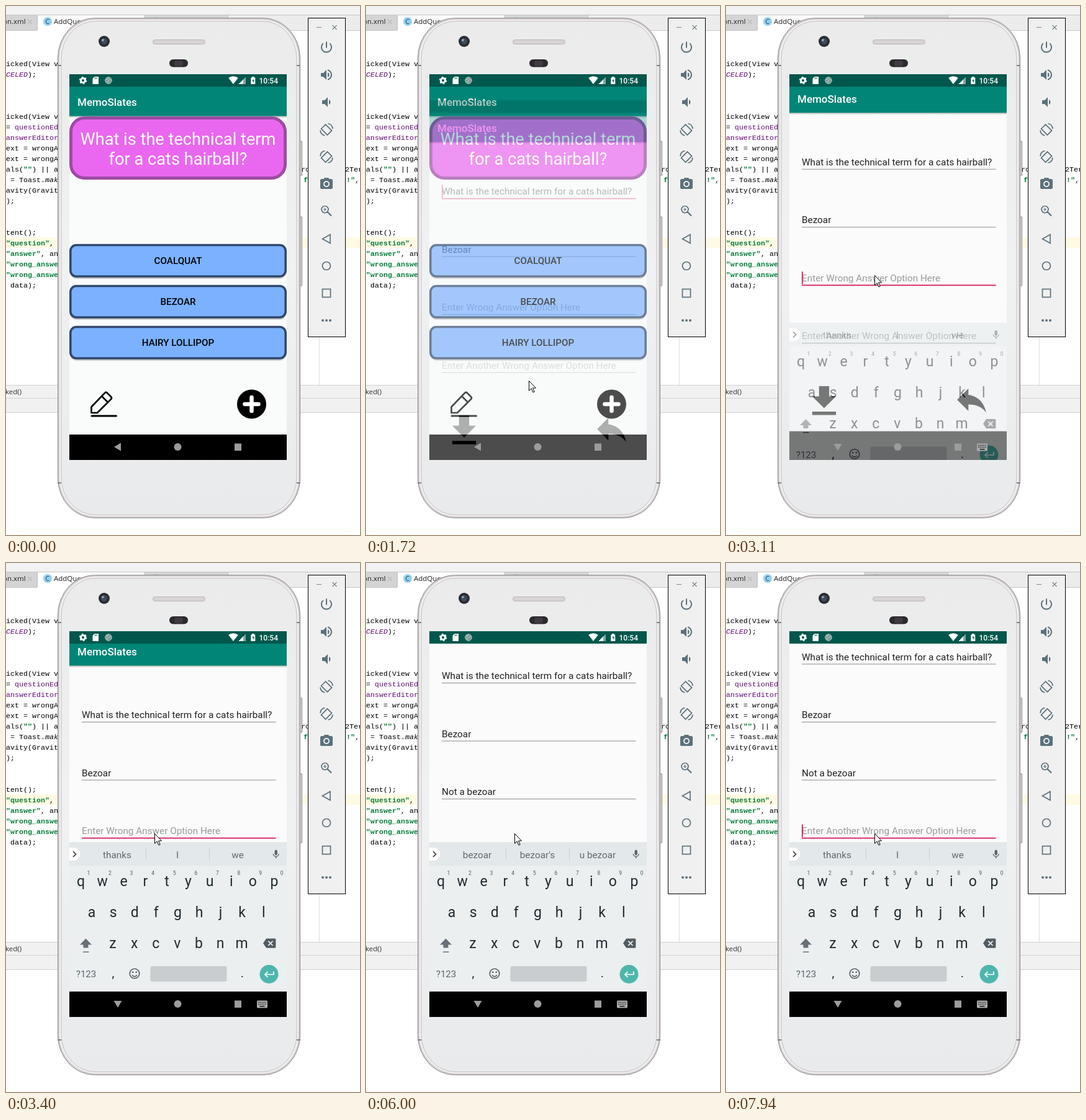
Write an HTML page that moves like this. It is 570x853 px and loops after 8 s.

```html
<!DOCTYPE html>
<html lang="en">
<head>
<meta charset="utf-8">
<title>Flash card app demo</title>
<style>
html,body{margin:0;width:100%;height:100%;overflow:hidden;background:#fff}
svg{display:block;width:570px;height:853px}
text{white-space:pre;font-family:Roboto,sans-serif}
.mid{text-anchor:middle}
.med{font-weight:500}
#code text{font:11.67px "Liberation Mono",monospace}
#ide text{font:11.5px "Open Sans",sans-serif}
.s{fill:#067d3a;font-weight:bold}
.p{fill:#660e7a}
.i{font-style:italic}
.field{font-size:15.3px}
</style>
</head>
<body>
<svg viewBox="0 0 570 853">
<defs>
  <clipPath id="screen"><rect x="102" y="110" width="350" height="622"/></clipPath>
  <clipPath id="below"><rect x="102" y="130" width="350" height="602"/></clipPath>
  <linearGradient id="shade" x2="0" y2="1"><stop stop-opacity=".28"/><stop offset="1" stop-opacity="0"/></linearGradient>
  <linearGradient id="body" x2="0" y2="1"><stop stop-color="#ebebec"/><stop offset=".5" stop-color="#f0f1f2"/><stop offset="1" stop-color="#e9eaec"/></linearGradient>
  <g id="bar">
    <rect x="102" y="177" width="350" height="4" fill="url(#shade)"/>
    <rect x="102" y="130" width="350" height="47.5" fill="#008577"/>
    <text x="115" y="161" font-size="17" class="med" fill="#fff">MemoSlates</text>
  </g>
</defs>

<g id="ide">
  <rect width="570" height="853" fill="#fff"/>
  <rect width="570" height="40" fill="#ececec"/>
  <rect width="570" height="14" fill="#f2f2f2"/>
  <path d="M0 14.5H570M0 39.5H570" stroke="#c6c6c6"/>
  <rect y="15" width="50" height="24" fill="#d4d4d4"/>
  <rect x="50" y="15" width="173" height="25" fill="#fff"/>
  <rect x="223" y="15" width="134" height="24" fill="#d4d4d4"/>
  <path d="M50.5 15V39M223.5 15V39M357.5 15V39" stroke="#bdbdbd"/>
  <text x="-5" y="29" fill="#222">on.xml</text>
  <path d="M35 22l7 7m0-7l-7 7" stroke="#aaa"/>
  <circle cx="67" cy="25" r="7" fill="#8fd0ee"/>
  <text x="67" y="29" class="mid" fill="#345">C</text>
  <text x="77" y="29" fill="#222">AddQuestion</text>
  <circle cx="241" cy="25" r="7" fill="#8fd0ee"/>
  <rect y="373" width="570" height="17" fill="#fffae3"/>
  <path d="M504.5 40V611" stroke="#dedede"/>
  <rect y="611" width="570" height="45" fill="#f1f1f1"/>
  <path d="M0 611.5H570M0 632.5H570M0 655.5H570" stroke="#d0d0d0"/>
  <text x="-1" y="626" fill="#333">ked()</text>
</g>
<g id="code"></g>

<g id="phone">
  <path d="M473 218h3.5v55h-3.5zM473 340h3.5v111h-3.5z" fill="#d9d5d6" stroke="#8d898b"/>
  <rect x="83.5" y="19.5" width="390" height="806" rx="60" ry="64" fill="#d2cdcf" stroke="#8f8b8d"/>
  <rect x="86" y="22" width="385" height="801" rx="58" ry="62" fill="#f2f0f1"/>
  <rect x="89" y="24.5" width="379" height="796" rx="55" ry="60" fill="url(#body)" stroke="#c4bfc1"/>
  <path d="M83 96h6M468 96h6M83 769h6M468 769h6" stroke="#858183" stroke-width="2"/>
  <circle cx="158" cy="57" r="9" fill="#2a2d32"/><circle cx="158" cy="57" r="5" fill="#3f4a59"/><circle cx="156" cy="55" r="2" fill="#8ba0b8"/>
  <rect x="236.5" y="54.5" width="84" height="7" rx="3.5" fill="#d8d3d4" stroke="#bcb5b7"/>
  <rect x="263" y="86" width="30" height="12.5" rx="6.2" fill="#2c2a2d"/><rect x="271" y="88" width="14" height="9" rx="4" fill="#413a43"/>
</g>

<g clip-path="url(#screen)">
  <g id="home">
    <rect x="102" y="110" width="350" height="622" fill="#f9fcfb"/>
    <rect x="102" y="110" width="350" height="20" fill="#00574b"/>
    <use href="#bar"/>
    <rect x="104.5" y="180.5" width="345" height="97" rx="22" fill="#e968ef" stroke="#9d4ba4" stroke-width="5"/>
    <g class="mid" font-size="27.2" fill="#fff"><text x="277" y="223.5">What is the technical term</text><text x="277" y="255.5">for a cats hairball?</text></g>
    <g id="answers" class="mid med" font-size="15.2"></g>
    <path d="M137.5 656v-9.500L159 624q2-2 4 0l6 6q2 2 0 4L147 656zM154 629l9.500 9.500" fill="none" stroke="#000" stroke-width="2.700" stroke-linejoin="round"/>
    <path d="M138 661h39.500" stroke="#000" stroke-width="3" stroke-linecap="round"/>
    <circle cx="395.500" cy="642" r="23.500"/>
    <path d="M395.500 631v22M384.500 642h22" stroke="#fff" stroke-width="6.500" stroke-linecap="round"/>
    <rect x="102" y="691" width="350" height="41"/>
  </g>

  <g id="edit">
    <rect x="102" y="110" width="350" height="622" fill="#fbfbfb"/>
    <g clip-path="url(#below)"><g id="pan">
      <use href="#bar"/>
      <g id="fields"></g>
      <rect id="caret" width="1.700" height="20.500" fill="#d81b60"/>
      <path transform="translate(125.200 610.200) scale(2.730)" d="M19 9h-4V3H9v6H5l7 7 7-7zM5 18v2h14v-2H5z"/>
      <path transform="translate(364.300 609) scale(2.600)" d="M10 9V5l-7 7 7 7v-4.100c5 0 8.500 1.600 11 5.100-1-5-4-10-11-11z"/>
      <rect x="102" y="691" width="350" height="160"/>
    </g></g>
    <rect x="102" y="110" width="350" height="20" fill="#00574b"/>
  </g>

  <g id="board">
    <rect x="102" y="450" width="350" height="241" fill="#ebeff0"/>
    <rect x="102" y="450" width="350" height="38" fill="#e3e8ea"/>
    <rect x="102" y="691" width="350" height="41"/>
    <path d="M102 459h7a10.500 10.500 0 0 1 0 21h-7z" fill="#fff"/>
    <path d="M108 465l4.500 4.500-4.500 4.500" fill="none" stroke="#333" stroke-width="1.600"/>
    <path d="M225.500 459v21M327.500 459v21" stroke="#cdd3d6"/>
    <g id="hints" class="mid" font-size="15.300" fill="#5f6b71"><text x="179" y="475.500"/><text x="276" y="475.500"/><text x="373" y="475.500"/></g>
    <path transform="translate(426 461) scale(.73)" fill="#5c666b" d="M12 14c1.660 0 3-1.340 3-3V5c0-1.660-1.340-3-3-3S9 3.340 9 5v6c0 1.660 1.340 3 3 3zm5.300-3c0 3-2.540 5.100-5.300 5.100S6.700 14 6.700 11H5c0 3.410 2.720 6.230 6 6.720V21h2v-3.280c3.280-.48 6-3.300 6-6.720h-1.700z"/>
    <g id="keys" class="mid" fill="#1f2a30"></g>
    <path d="M128.500 605.500l9.500 10h-5.500v5h-8v-5H119zM124 626.500h9.500v1.500H124z" fill="#677076"/>
    <path transform="translate(414 603) scale(.85)" fill="#515c62" d="M22 3H7c-.69 0-1.230.35-1.590.88L0 12l5.410 8.110c.36.53.9.89 1.590.89h15c1.100 0 2-.9 2-2V5c0-1.100-.9-2-2-2zm-3 12.590L17.590 17 14 13.410 10.410 17 9 15.590 12.590 12 9 8.410 10.410 7 14 10.590 17.590 7 19 8.410 15.410 12 19 15.590z"/>
    <text x="129" y="668" class="mid" font-size="15" fill="#59646a">?123</text>
    <circle cx="207" cy="662" r="7.800" fill="none" stroke="#4e585d" stroke-width="1.600"/>
    <path d="M203 664.500q4 4.500 8 0" fill="none" stroke="#4e585d" stroke-width="1.600"/>
    <circle cx="204.200" cy="659.800" r="1.300" fill="#4e585d"/><circle cx="209.800" cy="659.800" r="1.300" fill="#4e585d"/>
    <rect x="232.500" y="650" width="123" height="25" rx="2.500" fill="#c9cdd0"/>
    <circle cx="423.500" cy="663" r="15" fill="#4db6ac"/>
    <path d="M431 658.500v5h-14m4.500-4.500l-4.500 4.500 4.500 4.500" fill="none" stroke="#fff" stroke-width="1.700"/>
  </g>

  <g id="status" fill="#fff">
    <circle cx="124" cy="120" r="3.500" fill="none" stroke="#fff" stroke-width="3"/>
    <circle cx="124" cy="120" r="5.300" fill="none" stroke="#fff" stroke-width="1.800" stroke-dasharray="2.500 3.050"/>
    <path d="M142.500 114h6.500v12h-9.500v-9z"/><path d="M143.500 115v3M146 115v3" stroke="#00574b"/>
    <circle cx="165" cy="120" r="5.300" fill="#7d9d97" stroke="#b9cbc7"/><path d="M161 119l4-3M162 123l6-5" stroke="#c5d4d1"/>
    <path d="M366 126l-7.800-10a12.500 12.500 0 0 1 15.600 0z"/>
    <path d="M386 114.500v11.500h-11.500z" fill="#82aaa4"/><path d="M382 118.500v7.500h-7.500z"/>
    <path d="M396 114h3.500v1.500h1.800v10.500h-7v-10.500h1.700z"/><path d="M398.500 117l-2 4h1.500v3l2-4h-1.500z" fill="#00574b"/>
    <text x="407.500" y="124.500" font-size="12" class="med">10:54</text>
  </g>
  <g fill="#9c9c9c">
    <path id="back" d="M174 711l11-6.500v13z"/>
    <path id="down" d="M173.500 706h13l-6.500 11z"/>
    <circle cx="276.500" cy="711" r="6"/>
    <rect x="368" y="705.500" width="11" height="11.500"/>
    <g id="switch"><rect x="404" y="705.500" width="17" height="12" rx="1.500" fill="#ababab"/><path d="M406 708.500h13M406 711.500h13" stroke="#222" stroke-width="1.500" stroke-dasharray="1.500 1.300"/><path d="M408.500 714.800h8" stroke="#222" stroke-width="1.500"/></g>
  </g>
</g>

<rect x="486.500" y="19.500" width="60" height="514" fill="#f0f0f0" stroke="#000"/>
<g fill="none" stroke="#5b717b" stroke-width="1.700">
  <path d="M500 34.500h8M525.500 31l7 7m0-7l-7 7" stroke="#75868e" stroke-width="1.200"/>
  <g id="turn"><rect x="511" y="192.500" width="10" height="14" transform="rotate(-45 516 199.500)"/><path d="M518.500 189.500q7 1.500 7.500 8.500M506 200.500q.5 7 7.500 8.500"/></g>
  <use href="#turn" transform="translate(1032 44) scale(-1 1)"/>
  <circle cx="513.500" cy="328" r="5.500"/><path d="M517.500 332l6.500 6.500" stroke-width="2.200"/><path d="M511 328h5M513.500 325.500v5" stroke-width="1.200"/>
  <path d="M509.500 375.500l12.500-7v14z"/><circle cx="516" cy="419" r="6.500"/><rect x="509.500" y="456.500" width="13" height="13"/>
</g>
<g fill="#5b717b">
  <g id="tools"></g>
  <circle cx="510" cy="507" r="2"/><circle cx="516" cy="507" r="2"/><circle cx="522" cy="507" r="2"/>
</g>
<path id="cursor" d="M.5.500v15.800l3.700-3.500 2.700 6.200 2.300-1-2.700-6h5z" fill="#fff" stroke="#000"/>
</svg>

<script>
const $ = id => document.getElementById(id);
const put = (id, items) => { $(id).innerHTML = items.join(''); };

// Background editor: baseline, x, markup
put('code', [
  [97, 0, 'icked(View v'],
  [114, 0, '<tspan class="p i">CELED</tspan>);'],
  [182, 0, 'icked(View v'],
  [199, 0, '= <tspan class="p">questionEd</tspan>'],
  [216, 0, '<tspan class="p">answerEditor</tspan>'],
  [233, 0, 'ext = wrongA'],
  [250, 0, 'ext = wrongA'],
  [267, 0, 'als(<tspan class="s">""</tspan>) || a'],
  [267, 475, 'ro'], [267, 546, '2Ter'],
  [284, 0, ' = Toast.<tspan class="i">mak</tspan>'],
  [284, 479, '<tspan class="s">f</tspan>'],
  [284, 541, '<tspan class="s">t!"</tspan>,'],
  [301, 0, 'avity(Gravit'],
  [318, 0, ');'],
  [369, 0, 'tent();'],
  [386, 0, '<tspan class="s">"question"</tspan>,'],
  [403, 0, '<tspan class="s">"answer"</tspan>, an'],
  [420, 0, '<tspan class="s">"wrong_answe</tspan>'],
  [437, 0, '<tspan class="s">"wrong_answe</tspan>'],
  [454, 0, ' data);']
].map(([y, x, s]) => `<text x="${x}" y="${y}">${s}</text>`));

put('answers', ['COALQUAT', 'BEZOAR', 'HAIRY LOLLIPOP'].map((s, i) => {
  const y = 385.5 + 66 * i;
  return `<rect x="103" y="${y + 1}" width="348" height="53.500" rx="11" opacity=".2"/>
    <rect x="103.800" y="${y}" width="346.400" height="50.500" rx="9.500" fill="#7bb1ff" stroke="#30486e" stroke-width="3.600"/>
    <text x="277" y="${y + 30.8}">${s}</text>`;
}));

put('keys', ['qwertyuiop', 'asdfghjkl', 'zxcvbnm'].map((row, r) =>
  [...row].map((c, i) => {
    const x = [120.5, 138, 172][r] + 34.6 * i;
    const digit = r ? '' : `<text x="${x + 12.3}" y="503" font-size="8.500" fill="#4d585e">${(i + 1) % 10}</text>`;
    return `<text x="${x}" y="${520.5 + 50.2 * r}" font-size="23">${c}</text>${digit}`;
  }).join('')).concat('<text x="172.500" y="668" font-size="20">,</text><text x="380.500" y="668" font-size="20">.</text>'));

put('tools', [
  [66.5, 'M13 3h-2v10h2V3zm4.830 2.170l-1.420 1.420C17.990 7.860 19 9.810 19 12c0 3.870-3.130 7-7 7s-7-3.130-7-7c0-2.190 1.010-4.140 2.580-5.420L6.170 5.170C4.230 6.820 3 9.260 3 12c0 4.970 4.030 9 9 9s9-4.030 9-9c0-2.740-1.230-5.180-3.170-6.830z'],
  [111, 'M3 9v6h4l5 5V4L7 9H3zm13.500 3c0-1.770-1.020-3.290-2.500-4.030v8.050c1.480-.73 2.500-2.250 2.500-4.020zM14 3.230v2.060c2.890.86 5 3.540 5 6.710s-2.110 5.850-5 6.710v2.060c4.010-.91 7-4.490 7-8.770s-2.990-7.860-7-8.770z'],
  [155, 'M18.500 12c0-1.770-1.020-3.290-2.500-4.030v8.050c1.480-.73 2.500-2.250 2.500-4.020zM5 9v6h4l5 5V4L9 9H5z'],
  [287, 'M9 2L7.170 4H4c-1.100 0-2 .9-2 2v12c0 1.100.9 2 2 2h16c1.100 0 2-.9 2-2V6c0-1.100-.9-2-2-2h-3.170L15 2H9zm3 15c-2.760 0-5-2.240-5-5s2.240-5 5-5 5 2.240 5 5-2.240 5-5 5zM12 8.800a3.200 3.200 0 1 0 .01 0z']
].map(([y, d]) => `<path transform="translate(504 ${y - 12})" d="${d}"/>`));

const LEFT = 122, PITCH = 93.5;
const fieldText = ['What is the technical term for a cats hairball?', 'Bezoar',
  'Enter Wrong Answer Option Here', 'Enter Another Wrong Answer Option Here'];
put('fields', fieldText.map((s, i) => `<text class="field" x="${LEFT}" y="${262 + PITCH * i}" fill="${i < 2 ? '#212121' : '#9a9a9a'}">${s}</text><rect x="${LEFT}" width="312.500"/>`));
const labels = [...$('fields').querySelectorAll('text')];
const lines = [...$('fields').querySelectorAll('rect')];
const hints = [...$('hints').children];

// Screen updates come in bursts: start, end, count
const bursts = [[130, 540, 6], [700, 1490, 11], [1650, 2200, 8], [2300, 2440, 3],
  [2540, 3110, 8], [3160, 3230, 2], [6000, 6280, 4]];
const pointer = [[130, 423, 812], [210, 404, 792], [380, 315, 716], [540, 243, 662],
  [700, 226, 657], [940, 150, 640], [1100, 143, 636], [1260, 170, 630], [1490, 249, 634],
  [1650, 262, 604], [1960, 274, 470], [2200, 271, 418], [2440, 262, 424],
  [2540, 254, 428], [2800, 239, 434], [3110, 239, 434], [3160, 239, 436]];
const scroll = [[3029, 0], [3110, -5.3], [3160, -9], [3230, -12], [5999, -12],
  [6000, -75], [6093, -93], [6187, -102], [6280, -105.5]];
const enter = [[1650, 42, .3], [1729, 20, .75], [1807, 6, 1], [1886, 0, 1]];
const rise = [[3110, 60.5, .5], [3160, 24, .85], [3230, 0, 1]];
const typed = [[0, ''], [4090, 'N'], [4260, 'No'], [4330, 'Not'], [4400, 'Not '], [4480, 'Not a'],
  [4550, 'Not a '], [4700, 'Not a b'], [4810, 'Not a be'], [4930, 'Not a bez'],
  [5330, 'Not a bezo'], [5640, 'Not a bezoa'], [5770, 'Not a bezoar']];
const offers = [[0, 'thanks,I,we'], [4090, 'N,Not,No'], [4260, 'No,Not,Now'], [4330, 'Not,Note,Nor'],
  [4400, 'a,sure,play'], [4480, 'a,at,as'], [4550, 'good,bad,big'], [4700, 'b,big,beautiful'],
  [4810, 'be,being,beautiful'], [4930, 'bez,bezel,beautiful'], [5460, "bezo,bezoar,bezoar's"],
  [5640, "bezoa,bezoar,bezoar's"], [5770, "bezoar,bezoar's,u bezoar"], [6187, 'thanks,I,we']];
const caretOff = [[2200, 2700], [3400, 3860], [6510, 6960], [7510, 7940]];

function snap(t) {
  let out = t;
  for (const [a, b, n] of bursts) {
    if (t < a) break;
    const step = (b - a) / (n - 1);
    out = Math.min(b, a + step * Math.floor((t - a) / step + 1e-6));
  }
  return out;
}
function mix(keys, t) {
  const k = keys.findIndex(row => row[0] > t);
  if (k < 0) return keys[keys.length - 1].slice(1);
  if (!k) return keys[0].slice(1);
  const a = keys[k - 1], b = keys[k], f = (t - a[0]) / (b[0] - a[0]);
  return a.slice(1).map((v, i) => v + (b[i + 1] - v) * f);
}
const hold = (keys, t) => keys.filter(row => row[0] <= t).pop()[1];
const show = (id, on) => $(id).setAttribute('visibility', on ? 'inherit' : 'hidden');
const move = (id, x, y) => $(id).setAttribute('transform', `translate(${x} ${y})`);

function draw(t) {
  const s = snap(t);
  show('cursor', t >= 130);
  move('cursor', ...mix(pointer, s).map(Math.round));

  show('edit', t >= 1650);
  const [drop, fade] = mix(enter, s);
  move('edit', 0, drop);
  $('edit').setAttribute('opacity', fade);
  move('pan', 0, mix(scroll, s)[0]);

  const keyboard = t >= 3110;
  const [low, alpha] = mix(rise, s);
  ['board', 'down', 'switch'].forEach(id => show(id, keyboard));
  show('back', !keyboard);
  move('board', 0, low);
  $('board').setAttribute('opacity', alpha);

  const text = hold(typed, t);
  labels[2].textContent = text || fieldText[2];
  labels[2].setAttribute('fill', text ? '#212121' : '#9a9a9a');
  hold(offers, t).split(',').forEach((word, i) => { hints[i].textContent = word; });

  const focus = t < 2940 ? 0 : t < 6000 ? 2 : 3;
  lines.forEach((line, i) => {
    const on = i === focus;
    line.setAttribute('y', 268 + PITCH * i - (on ? .3 : 0));
    line.setAttribute('height', on ? 1.8 : 1);
    line.setAttribute('fill', on ? '#d81b60' : '#8c8c8c');
  });
  const advance = focus === 2 && text ? labels[2].getComputedTextLength() : 0;
  $('caret').setAttribute('x', LEFT + advance);
  $('caret').setAttribute('y', 246.500 + PITCH * focus);
  show('caret', !caretOff.some(([a, b]) => t >= a && t < b));
}

const start = performance.now();
function tick() {
  draw((performance.now() - start) % 8000);
  requestAnimationFrame(tick);
}
tick();
</script>
</body>
</html>
```
